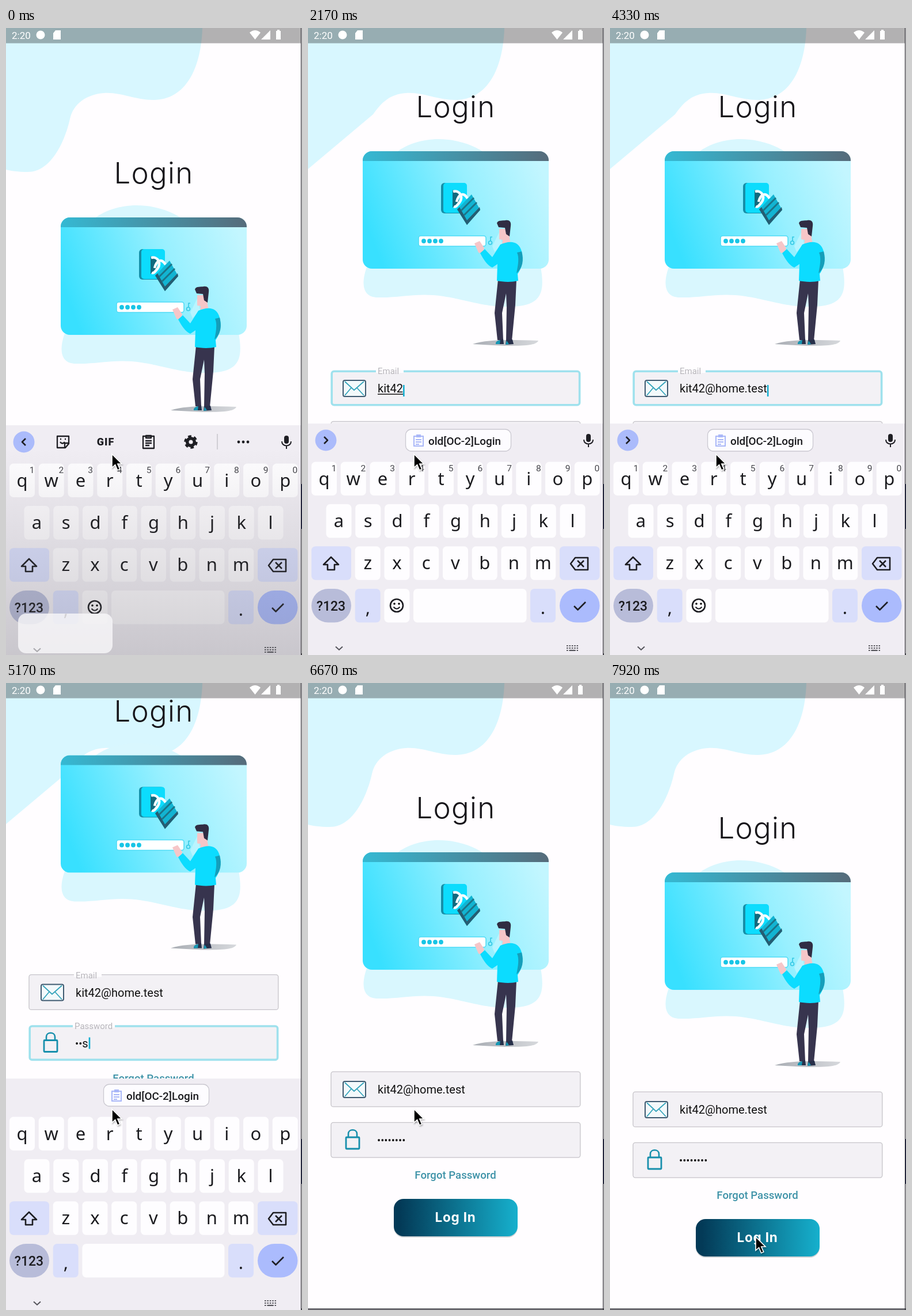
Animation of 514x1089 px, one loop 8000 ms. Source, as an HTML page:

```html
<!DOCTYPE html>
<html lang="en">
<head>
<meta charset="utf-8">
<title>Login form</title>
<style>
html, body { margin: 0; width: 100%; height: 100%; overflow: hidden; background: #fffdff; }
svg { display: block; width: 100vw; height: 100vh; }
text { font-family: Roboto, "Open Sans", sans-serif; white-space: pre; }
.title { font: 300 51px Inter, sans-serif; letter-spacing: 1.3px; fill: #17151a; }
.button { font: 700 22.5px Inter, sans-serif; letter-spacing: .8px; fill: #fff; }
.mid { text-anchor: middle; }
.key { fill: #fefdff; }
.tint { fill: #d9defb; }
.letter { font: 400 31px "Noto Sans", sans-serif; text-anchor: middle; fill: #1b1b1f; }
.hint { font-size: 15.5px; text-anchor: middle; fill: #45454b; }
.line { fill: none; stroke: #1e1e23; stroke-width: 2.6; stroke-linejoin: round; }
.field { fill: #f3f1f5; stroke: #c6c4c9; stroke-width: 1.3; }
.field.focus { stroke: #9fe1ed; stroke-width: 3.6; }
.label { font-size: 15px; fill: #b7b5ba; }
.input { font-size: 20px; fill: #111; }
.rising .row { fill-opacity: .78; }
</style>
</head>
<body>
<svg viewBox="0 0 514 1089" preserveAspectRatio="none">
  <defs>
    <linearGradient id="screen" x1="0" y1=".55" x2="1" y2=".3">
      <stop stop-color="#38e0ff"/><stop offset=".3" stop-color="#68e8ff"/><stop offset=".6" stop-color="#98f0ff"/><stop offset="1" stop-color="#c3f6ff"/>
    </linearGradient>
    <linearGradient id="bar"><stop stop-color="#35b9d3"/><stop offset="1" stop-color="#566b7a"/></linearGradient>
    <linearGradient id="btn"><stop offset=".05" stop-color="#033a57"/><stop offset="1" stop-color="#16b0cd"/></linearGradient>
    <linearGradient id="shade" x1="0" y1="0" x2="0" y2="1">
      <stop offset=".1" stop-color="#55545a" stop-opacity="0"/><stop offset="1" stop-color="#55545a" stop-opacity=".25"/>
    </linearGradient>
    <linearGradient id="ground"><stop stop-color="#a9adb4"/><stop offset="1" stop-color="#d6d8dc"/></linearGradient>
    <clipPath id="frame"><rect x="95" y="329" width="323" height="204" rx="16"/></clipPath>
  </defs>

  <rect width="514" height="1089" fill="#fffdff"/>
  <path id="blob" fill="#d8f7ff"/>
  <path d="M0 1087.5H514" stroke="#2b2b33" stroke-width="2"/>

  <g id="page">
    <text class="title mid" x="256.500" y="270">Login</text>

    <g fill="#d9f7fe">
      <path d="M148 335C190 299 262 299 312 335Z"/>
      <path d="M104 525C92 555 92 583 122 583C160 584 190 574 235 581C285 589 305 600 355 599C405 597 412 575 404 530Z"/>
    </g>
    <g clip-path="url(#frame)">
      <rect x="95" y="329" width="323" height="204" fill="url(#screen)"/>
      <rect x="95" y="329" width="323" height="17" fill="url(#bar)"/>
    </g>
    <rect x="231" y="384" width="44" height="53" rx="6" fill="#168fa8"/>
    <rect x="235" y="384" width="41" height="52" rx="5" fill="#0cdcfd"/>
    <path d="M251 396V427L262 423V400Z" fill="#126a7e"/>
    <path d="M252 399C264 396 270 409 263 418S255 426 253 425M258 417C261 404 270 399 277 411" fill="none" stroke="#f4fdff" stroke-width="4.5"/>
    <path d="M259 430L284 404L299 431L276 457Z" fill="#12b4d2"/>
    <path d="M259 430L276 457L299 431L298 426L276 449L263 426Z" fill="#255d72"/>
    <path d="M266 432L288 410M271 440L293 418" stroke="#1b7489" stroke-width="3"/>
    <rect x="192" y="476" width="117" height="18" rx="4" fill="#fff" stroke="#50dcf6" stroke-width="1.6"/>
    <g id="pins" fill="#17c5e6"></g>
    <g fill="none" stroke="#35c8e4" stroke-width="1.6"><circle cx="316.500" cy="488" r="3"/><path d="M317 485V478H320"/></g>

    <path d="M286 664C315 655 350 657 400 658C396 666 380 667 340 667Z" fill="url(#ground)"/>
    <path d="M320 494L333 468L337 490L324 504Z" fill="#fff" opacity=".3"/>
    <path d="M330 552H362L360 596L354 658H344L345 600L344 576L337 610L339 657H329L324 610Z" fill="#37344e"/>
    <path d="M326 664C326 658 334 657 339 655L340 664ZM343 665L344 657L355 656L357 664Z" fill="#28304a"/>
    <path d="M326 664C326 658 331 658 334 657L333 664ZM343 665L345 658L349 664Z" fill="#1597b4"/>
    <path d="M332 464L350 464L350 480L352 490L337 491L338 483L332 482Z" fill="#f6c6c8"/>
    <path d="M328 454C330 448 338 450 343 449C351 448 353 453 352 459L350 477L344 473L342 462L331 461Z" fill="#302d43"/>
    <path d="M289 489L298 485L306 497L303 507L296 505Z" fill="#f6c6c8"/>
    <path d="M299 506L307 499L320 513L334 491C350 484 366 484 371 503C375 519 370 534 364 542L365 554C352 557 338 556 328 554L329 525L320 531C312 528 304 516 299 506Z" fill="#0cdcff"/>
    <path d="M363 505C367 514 365 526 362 541C373 532 375 518 371 503Z" fill="#159eba"/>

    <rect id="mailBox" rx="4"/>
    <rect x="61" y="727" width="39" height="28" rx="3" fill="#f3f9fb" stroke="#3e5a70" stroke-width="2"/>
    <path d="M64 729L80 744L97 729M64 753L75 740M97 753L85 740" fill="none" stroke="#35a4bb" stroke-width="1.8"/>
    <g id="mailLabel"><rect x="118" y="707" width="48" height="7" fill="#fefcff"/><text class="label" x="121" y="716">Email</text></g>
    <text id="mail" class="input" x="121" y="748"></text>
    <path id="rule" stroke="#111" stroke-width="1.3"/>

    <rect id="passBox" rx="4"/>
    <rect x="66" y="824" width="23" height="20" rx="1" fill="none" stroke="#178fac" stroke-width="2.8"/>
    <path d="M70 824V818C70 809 85 809 85 818V824" fill="none" stroke="#178fac" stroke-width="2.6"/>
    <g id="passLabel"><rect x="116" y="795" width="73" height="7" fill="#fefcff"/><text class="label" x="119" y="804">Password</text></g>
    <text id="pass" class="input" x="120" y="836"><tspan id="dots" font-size="18.300"></tspan><tspan id="peek"></tspan></text>
    <rect id="caret" width="2.600" height="20" fill="#13aed0"/>

    <text class="mid" x="256" y="896" font-size="18.600" font-weight="500" fill="#3f93a8">Forgot Password</text>
    <rect x="149" y="933" width="215" height="65" rx="17" fill="#55606a" opacity=".28"/>
    <rect x="149" y="931" width="215" height="65" rx="17" fill="url(#btn)"/>
    <text class="button mid" x="256" y="971">Log In</text>
  </g>

  <rect width="512" height="26.500" fill="#000" fill-opacity=".3"/>
  <g fill="#fff">
    <text x="10" y="18.500" font-size="17">2:20</text>
    <circle cx="60" cy="12" r="7.500"/>
    <path d="M86 4H95V20H82V9Z"/>
    <path d="M423 8Q432.500 0 442 8L432.500 20ZM459 4V20H443ZM470 5H471V3H475V5H477V20H469V5Z"/>
  </g>

  <g id="board">
    <rect y="687" width="512" height="403" fill="#f0edf3"/>
    <g id="keys"></g>
    <g id="tools">
      <circle cx="31" cy="716" r="18.500" fill="#abbbfb"/>
      <path id="arrow" class="line"/>
      <rect x="483" y="705" width="8" height="14" rx="4" fill="#1e1e23"/>
      <path d="M479 715C479 725 495 725 495 715M487 722V728" class="line" style="stroke-width:2"/>
    </g>
    <g id="strip">
      <path class="line" d="M89 706H109V719L103 726H89ZM109 718H102V726M94 716Q98 721 102 716M94 711H96M102 711H104" style="stroke-width:2.3"/>
      <text class="mid" x="173" y="722" font-size="18" font-weight="900" fill="#1e1e23" letter-spacing="1">GIF</text>
      <path class="line" d="M238 706H257V727H238ZM243 705H252V709H243ZM242 714H253M242 718H253M242 722H249" style="stroke-width:2.3"/>
      <circle cx="321" cy="716" r="6.300" fill="none" stroke="#1e1e23" stroke-width="5.500"/>
      <circle cx="321" cy="716" r="9.700" fill="none" stroke="#1e1e23" stroke-width="4" stroke-dasharray="5.600 4.560"/>
      <path d="M367 702V729" stroke="#c7c5cb" stroke-width="1.500"/>
      <g fill="#1e1e23"><circle cx="404" cy="716" r="2.400"/><circle cx="412" cy="716" r="2.400"/><circle cx="420" cy="716" r="2.400"/></g>
    </g>
    <g id="chip">
      <rect x="169.500" y="697" width="183" height="38" rx="10" fill="#fdfcff" stroke="#cbc9d1" stroke-width="1.300"/>
      <path d="M184 709H200V726H184ZM189 707H195V710H189ZM187 715H197M187 719H197M187 723H193" fill="none" stroke="#a9b7f8" stroke-width="2"/>
      <text x="209" y="723.500" font-size="18.900" font-weight="500" fill="#1b1b1f">old[OC-2]Login</text>
    </g>
    <path d="M48 1074.500L54 1080L60 1074.500" fill="none" stroke="#55555b" stroke-width="2"/>
    <path d="M449 1073H469M449 1077H469M449 1081H469" stroke="#55555b" stroke-width="2.200" stroke-dasharray="2.500 1.900"/>
    <path d="M454 1081H464" stroke="#55555b" stroke-width="2.200"/>
  </g>
  <g id="veil">
    <rect y="690" width="512" height="399" fill="url(#shade)"/>
    <rect x="21" y="1017" width="164" height="69" rx="14" fill="#f8f7f9" fill-opacity=".82"/>
    <path d="M48 1077.500L54 1083L60 1077.500" fill="none" stroke="#aaa9ae" stroke-width="2"/>
  </g>

  <path d="M512.600 0V1089" stroke="#29292e" stroke-width="1.200"/>
  <rect x="513" y="792" width="1" height="78" fill="#1b2045"/>
  <path id="pointer" d="M0 0V23.500L5.600 18.600L9.600 28L13.800 26.200L9.800 17H17Z" fill="#000" stroke="#fff" stroke-width="1.600" style="filter:drop-shadow(1px 2px 1px #0004)"/>
</svg>

<script>
const LOOP = 8000, STEP = 1000 / 12;
const MAIL = 'kit42@home.test', PASS = 'passkeys';
const MAIL_TIMES = [1080, 1250, 1420, 1670, 1920, 2500, 2750, 2920, 3080, 3250, 3500, 3830, 4000, 4170, 4250];
const PASS_TIMES = [4830, 5000, 5080, 5330, 5500, 5670, 5830, 6000];
const SWITCH = 4500, HIDE = 6330;

const SCROLL = [[0, 0], [80, 0], [170, -45], [250, -95], [330, -115], [SWITCH, -115], [4580, -150], [4750, -203.5],
  [6330, -203.5], [6500, -115], [6670, -35], [6750, -13], [6830, -4], [6920, 0], [LOOP, 0]];
const DROP = [[0, 3], [80, 0], [HIDE, 0], [6420, 110], [6500, 260], [6580, 410], [LOOP, 410]];
const CHIP = [[0, .9], [250, .93], [420, .987], [500, 1], [LOOP, 1]];
const POINTER_X = [[0, 184], [6830, 184], [7080, 194], [7420, 232], [7670, 251], [7830, 253], [LOOP, 253]];
const POINTER_Y = [[0, 740], [6830, 740], [7080, 775], [7420, 890], [7670, 954], [7830, 962], [LOOP, 962]];

const BLOB_TOP = 'M0 0H341C339 70 312 125 256 125C222 125 200 111 170 113C142 115 ';
const FULL_BLOB = BLOB_TOP + '117 130 111 158C102 198 78 250 38 250C20 250 8 248 0 246Z';
const CUT_BLOB = BLOB_TOP + '128 129 113 150L0 245Z';

const $ = id => document.getElementById(id);
const set = (id, attrs) => { for (const k in attrs) $(id).setAttribute(k, attrs[k]); };
const show = (id, on) => { $(id).style.display = on ? '' : 'none'; };
const write = (id, text) => { if ($(id).textContent !== text) $(id).textContent = text; };

function track(points, t) {
  const i = points.findIndex(p => p[0] >= t);
  if (i < 1) return points[0][1];
  const [t0, a] = points[i - 1], [t1, b] = points[i];
  return a + (b - a) * (t - t0) / (t1 - t0);
}

// The thicker focus border grows inwards.
function setBox(id, top, focus) {
  const inset = focus ? 1.8 : .6;
  set(id, {
    class: focus ? 'field focus' : 'field',
    x: 39.4 + inset, y: top + inset, width: 434 - 2 * inset, height: 62 - 2 * inset
  });
}

function buildKeys() {
  const PITCH = 50.75;
  let out = '';
  const cap = (x, y, w, cls, extra = '') =>
    `<rect x="${x}" y="${y}" width="${w}" height="58.5" rx="7" class="key ${cls}" ${extra}/>`;
  const letters = (chars, x, y, cls) => [...chars].forEach((c, i) => {
    const kx = x + i * PITCH;
    out += cap(kx, y, 44, cls) + `<text class="letter" x="${kx + 22}" y="${y + 40}">${c}</text>`;
  });
  letters('qwertyuiop', 6, 753.5, '');
  letters('asdfghjkl', 31.5, 827, 'row');
  letters('zxcvbnm', 81.7, 900.3, 'row');
  out += '<g id="hints">' + [...'1234567890'].map((c, i) =>
    `<text class="hint" x="${45 + i * PITCH}" y="770">${c}</text>`).join('') + '</g>';
  out += cap(6, 900.3, 69, 'tint') + cap(437, 900.3, 69.5, 'tint');
  out += '<path class="line" d="M40 919L27 932H34V941H46V932H53Z"/>';
  out += '<path class="line" d="M464 920H486V941H464L456 930.500ZM468 925L479 936M479 925L468 936"/>';

  const y = 974;
  out += cap(6, y, 69, '', 'style="fill:#b8bcd9;rx:29px"');
  out += '<text class="mid" x="40" y="1012" font-size="23" font-weight="500" fill="#1b1b1f">?123</text>';
  out += cap(81.7, y, 44, 'tint') + cap(386, y, 44, 'tint');
  out += '<text class="letter" x="104" y="1018">,</text><text class="letter" x="408" y="1018">.</text>';
  out += `<rect id="space" y="${y}" height="58.5" rx="7" class="key row"/>`;
  out += '<g id="emoji">' + cap(132.4, y, 44, 'row') +
    '<circle class="line" cx="154" cy="1003" r="11"/><circle cx="150" cy="1000" r="1.8"/><circle cx="158" cy="1000" r="1.8"/>' +
    '<path class="line" d="M148.500 1005.500Q154 1012 159.500 1005.500" style="stroke-width:2"/></g>';
  out += cap(437, y, 69.5, '', 'style="fill:#abbbfd;rx:29px"');
  out += '<path class="line" d="M462 1004L468.500 1010.500L482 997"/>';
  $('keys').innerHTML = out;
}

function draw(t) {
  const secret = t >= SWITCH, open = t < HIDE;
  const scroll = track(SCROLL, t), drop = track(DROP, t), rising = t < 80;
  const mailCount = MAIL_TIMES.filter(k => k <= t).length;
  const passCount = PASS_TIMES.filter(k => k <= t).length;

  set('page', { transform: `translate(0 ${scroll})` });
  set('blob', { d: t >= 170 && t < 6420 ? CUT_BLOB : FULL_BLOB });

  // Form fields
  setBox('mailBox', 709.5, open && !secret);
  setBox('passBox', 797.7, open && secret);
  show('mailLabel', open);
  show('passLabel', open && secret);
  write('mail', MAIL.slice(0, mailCount));
  const peeking = passCount && passCount < PASS.length;
  write('dots', '•'.repeat(peeking ? passCount - 1 : passCount));
  write('peek', peeking ? PASS[passCount - 1] : '');

  const width = $(secret ? 'pass' : 'mail').getComputedTextLength();
  set('rule', { d: mailCount && mailCount < 6 ? `M121 751H${121 + width}` : '' });
  const typed = secret ? PASS_TIMES[passCount - 1] || SWITCH : MAIL_TIMES[mailCount - 1] || 0;
  show('caret', open && (t - typed) % 1000 < 500);
  set('caret', { x: 121 + width, y: secret ? 819 : 735 });

  // Keyboard
  show('board', drop < 405);
  set('board', { transform: `translate(0 ${drop})`, class: rising ? 'rising' : '' });
  show('veil', rising);
  const wide = t < 250;
  show('strip', wide);
  show('chip', !wide);
  show('tools', !secret);
  show('hints', !secret);
  show('emoji', !secret);
  set('space', secret ? { x: 132.4, width: 247 } : { x: 183, width: 196.5 });
  set('arrow', { d: wide ? 'M34 710L28 716L34 722' : 'M28 710L34 716L28 722' });
  const s = track(CHIP, t);
  set('chip', { transform: `translate(261 716) scale(${s}) translate(-261 -716)` });

  set('pointer', { transform: `translate(${track(POINTER_X, t)} ${track(POINTER_Y, t)})` });
}

$('pins').innerHTML = [201, 211, 221, 231].map(x => `<circle cx="${x}" cy="485" r="3.9"/>`).join('');
buildKeys();

const start = performance.now();
function tick() {
  const t = (performance.now() - start) % LOOP;
  // Twelve pictures a second, each timed to the nearest 10 ms.
  draw(Math.round(Math.floor((t + 4) / STEP) * STEP / 10) * 10);
  requestAnimationFrame(tick);
}
tick();
</script>
</body>
</html>
```
